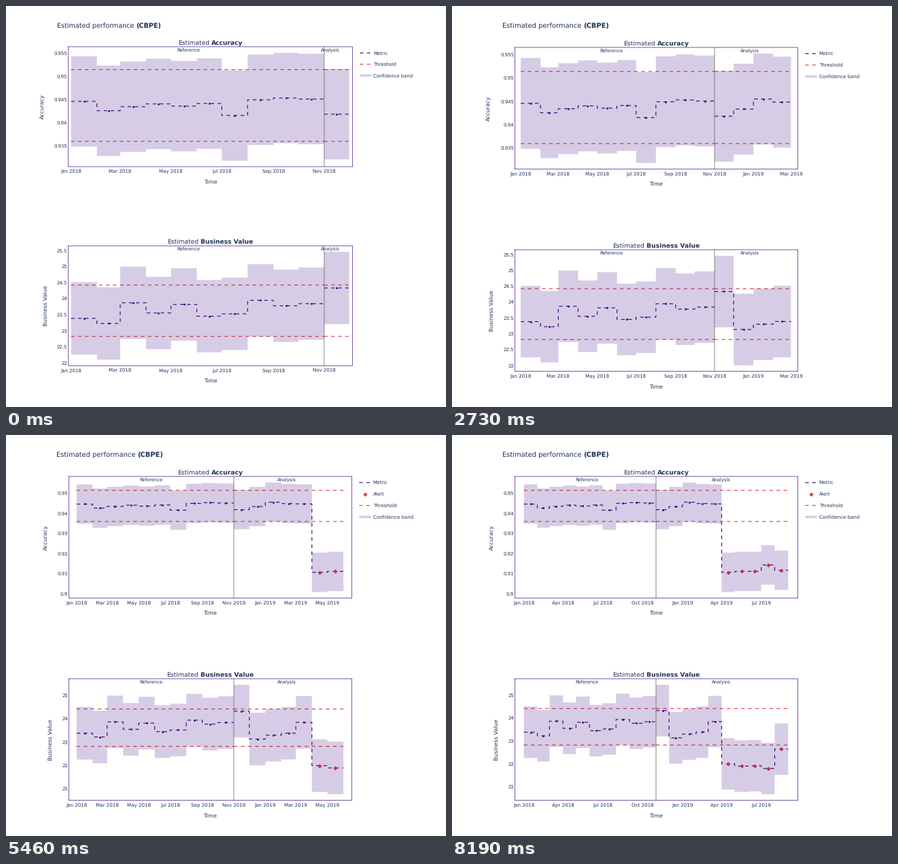
Animation, 647 px wide and 589 px high, one loop 9.09 s. Source, as a matplotlib script:

```python
import numpy as np
import matplotlib.pyplot as plt
from matplotlib.animation import FuncAnimation

W, H, DPI = 647, 589, 64
PT = 72 / DPI  # points per pixel
STEP = 30      # ms per frame
ENDS = np.cumsum([930, 900, 900, 930, 900, 900, 900, 930, 900, 900])

PURPLE, RED, INK, GREY = "#3b0280", "#dd4040", "#1f3358", "#555555"
REF = 10           # reference months; the rest is analysis
FIRST_ALERT = 15

plt.rcParams.update({
    "font.family": "DejaVu Sans",
    "text.hinting": "none",
    "lines.scale_dashes": False,
    "lines.dash_capstyle": "butt",
    "lines.dash_joinstyle": "miter",
    "path.snap": False,
})

months = np.arange("2018-01", "2019-10", dtype="datetime64[M]")
days = (months.astype("datetime64[D]") - np.datetime64("2018-01-01")).astype(float)
mids = (days[:-1] + days[1:]) / 2

ACCURACY = dict(
    name="Accuracy", split=302, half=0.00977, limits=(0.93592, 0.95142),
    ticks=(0.005, 0.01), label_x=(56, 61),
    values=np.array([
        0.94456, 0.94255, 0.94341, 0.94402, 0.94354, 0.94410, 0.94152,
        0.94491, 0.94529, 0.94507, 0.94180, 0.94333, 0.94550, 0.94482,
        0.94466, 0.91064, 0.91108, 0.91111, 0.91430, 0.91170]))
BUSINESS = dict(
    name="Business Value", split=286.2, half=1.127, limits=(22.823, 24.422),
    ticks=(0.5, 1), label_x=(61, 68),
    values=np.array([
        23.385, 23.225, 23.870, 23.553, 23.818, 23.453, 23.525,
        23.946, 23.776, 23.842, 24.331, 23.137, 23.303, 23.388,
        23.850, 22.000, 21.900, 21.918, 21.797, 22.645]))

fig = plt.figure(figsize=(W / DPI, H / DPI), dpi=DPI, facecolor="white")
ax = fig.add_axes([0, 0, 1, 1])
ax.set(xlim=(0, W), ylim=(H, 0))
ax.axis("off")


def text(x, y, s, size, ha="left", **kw):
    return ax.text(x, y, s, fontsize=size * PT, color=INK, ha=ha,
                   va="baseline", zorder=6, **kw)


def two_tone(split, y, plain, bold, size):
    """Plain text ending one space before split, bold text starting there."""
    return [text(split - 0.318 * size, y, plain, size, "right"),
            text(split, y, bold, size, weight="bold")]


def line(x, y, color, width, z=4):
    return ax.plot(x, y, color=color, lw=width * PT, zorder=z)[0]


def dashes(x, y, color, u):
    out = line(x, y, color, 2 * u, z=2)
    out.set_linestyle((0, (9 * u * PT, 9 * u * PT)))
    return out


def dots(x, y, marker, color, size):
    return ax.plot(x, y, marker, color=color, ms=size * PT, mew=0, zorder=2.5)[0]


def box(x, y):
    return ax.fill(x, y, color=PURPLE, alpha=0.2, lw=0, zorder=3)[0]


def stairs(edges, values):
    return np.repeat(edges, 2)[1:-1], np.repeat(values, 2)


def panel(spec, n, u, left, right, top, bottom):
    alert = n > FIRST_ALERT
    vals = spec["values"][:n]
    low, high = vals - spec["half"], vals + spec["half"]

    # first and last marker keep a fixed margin inside the time axis
    pad = 0.0555 * (right - left)
    sx = (right - left - 2 * pad - alert) / (mids[n - 1] - mids[0])
    px = lambda d: left + pad + (d - mids[0]) * sx

    span = high.max() - low.min()
    vmin, vmax = low.min() - span / 18, high.max() + span / 18
    py = lambda v: bottom - (v - vmin) / (vmax - vmin) * (bottom - top)

    edges = px(days[:n + 1])
    out = []
    for a, b in ((0, REF), (REF, n)):
        out.append(dashes(*stairs(edges[a:b + 1], py(vals[a:b])), PURPLE, u))
        for lim in spec["limits"]:
            out.append(dashes([edges[a], edges[b]], [py(lim)] * 2, RED, u))
        # right edge of each section name follows the mean month start
        out.append(text((edges[a] + edges[b - 1]) / 2 + 22.7, top + 6.7,
                        "Analysis" if a else "Reference", 11.75 * u, "right"))

    cut = min(n, FIRST_ALERT)
    out.append(dots(px(mids[:cut]), py(vals[:cut]), "o", PURPLE, 5 * u))
    if alert:
        out.append(dots(px(mids[cut:n]), py(vals[cut:]), "D", RED, 7.6 * u))

    x, y_low = stairs(edges, py(low))
    _, y_high = stairs(edges, py(high))
    out.append(box(np.r_[x, x[::-1]], np.r_[y_high, y_low[::-1]]))

    out.append(line([edges[REF]] * 2, [top, bottom], GREY, 1.2 * u))
    out.append(line([left, right, right, left, left],
                    [top, top, bottom, bottom, top], PURPLE, 1.15 * u))

    step = spec["ticks"][alert]
    for i in range(int(np.ceil(vmin / step)), int(np.floor(vmax / step)) + 1):
        out.append(text(left - 1.4, py(i * step) + 2.5, f"{i * step:g}",
                        12.1 * u, "right"))

    for m in range(0, n + 1, 3 if n > 18 else 2):
        if px(days[m]) <= right:
            label = months[m].item().strftime("%b %Y")
            out.append(text(px(days[m]), bottom + 15.5 * u, label, 12.3 * u, "center"))

    out.append(text(300.4, bottom + 42.8 * u, "Time", 14 * u, "center"))
    out.append(text(spec["label_x"][alert], (top + bottom) / 2, spec["name"], 14 * u,
                    "center", rotation=90, rotation_mode="anchor"))
    out += two_tone(spec["split"], top - 3, "Estimated", spec["name"], 16 * u)
    return out


def legend(n, u, x, y):
    names = ["Metric", "Alert", "Threshold", "Confidence band"]
    if n <= FIRST_ALERT:
        names.remove("Alert")
    out, w, t = [], 30 * u, 3 * u
    for i, name in enumerate(names):
        yi = y + 29 * u * i
        if name == "Alert":
            out.append(dots([x + w / 2], [yi], "D", RED, 7.6 * u))
        elif name == "Confidence band":
            out.append(box([x, x + w, x + w, x], [yi - t, yi - t, yi + t, yi + t]))
        else:
            color = PURPLE if name == "Metric" else RED
            out.append(dashes([x, x + w], [yi, yi], color, u))
        out.append(text(x + 35 * u, yi + 2.5, name, 12 * u))
    return out


def build(n):
    # u is the size of one layout unit in pixels
    if n == REF + 1:
        u, left, right = 0.570, 91.5, 509.5
        rows = (59.9, 236), (352.2, 528.3)
        key, split = (520.4, 69), 191.2
    else:
        u, left, right = 0.5793, 92.5, 508.5
        rows = (60.9, 239.5), (358, 536.6)
        key, split = (519.3, 69.9), 193.3
    out = two_tone(split, 32, "Estimated performance", "(CBPE)", 17 * u)
    for spec, row in zip((ACCURACY, BUSINESS), rows):
        out += panel(spec, n, u, left, right, *row)
    return out + legend(n, u, *key)


stages = [build(REF + 1 + i) for i in range(len(ENDS))]


def show(frame):
    now = np.searchsorted(ENDS, frame * STEP, side="right")
    for i, stage in enumerate(stages):
        for artist in stage:
            artist.set_visible(i == now)


anim = FuncAnimation(fig, show, frames=int(ENDS[-1]) // STEP, interval=STEP,
                     init_func=lambda: show(0), repeat=True, repeat_delay=0)
plt.show()
```
